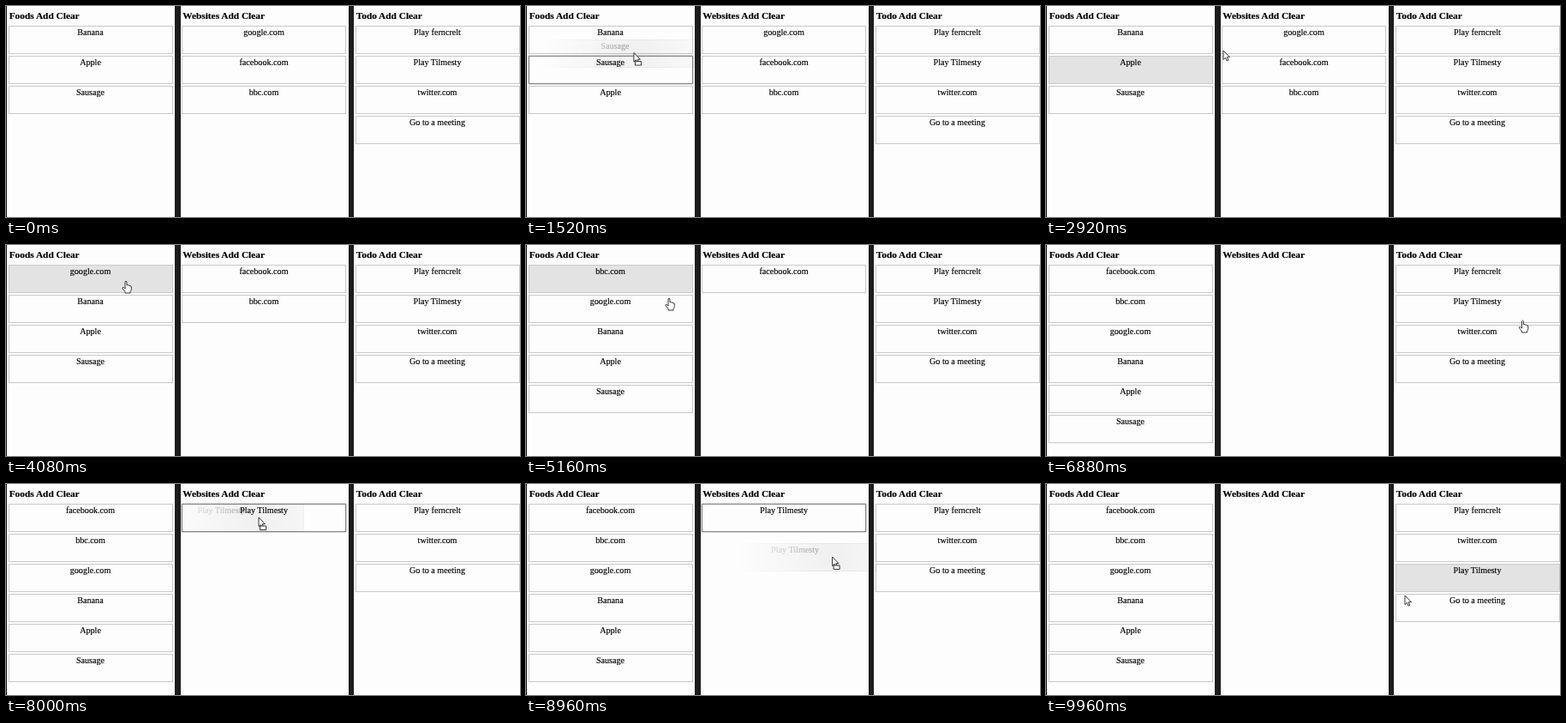
An HTML page for the animation above (10 s loop, 600 px wide and 246 px high).

```html
<!DOCTYPE html>
<html lang="en">
<head>
<meta charset="utf-8">
<title>Sortable lists</title>
<style>
  html, body { margin: 0; width: 100%; height: 100%; overflow: hidden; background: #1c1c1c; }
  #stage { position: absolute; left: 0; top: 0; width: 600px; height: 246px; overflow: hidden;
    font-family: "Liberation Serif", "Times New Roman", serif; color: #000; -webkit-text-stroke: .15px #000; }
  #stage > * { position: absolute; left: 0; top: 0; box-sizing: border-box; }
  .column { width: 196px; height: 246px; background: #fdfdfd; }
  .title { font-weight: bold; font-size: 11.35px; line-height: 14px; white-space: nowrap; }
  .card { width: 192px; height: 33px; border: 1px solid #c9c9c9; background: #fdfdfd;
    font-size: 10.15px; line-height: 14px; text-align: center; white-space: nowrap; }
  .card.active { background: #e3e3e3; }
  .card.held { border-color: #858585; box-shadow: 0 0 1.5px #8a8a8a; }
  .card.ghost { background: #dedede; border-color: #bbb; opacity: .4; mix-blend-mode: multiply; }
  svg { overflow: visible; }
</style>
</head>
<body>
<div id="stage"></div>
<script>
const LOOP = 10000;
const CARD = { w: 192, h: 33, pitch: 35, top: 23 };
const GRIP_Y = 16;
const lists = {
  Foods: ['Banana', 'Apple', 'Sausage'],
  Websites: ['google.com', 'facebook.com', 'bbc.com'],
  Todo: ['Play ferncrelt', 'Play Tilmesty', 'twitter.com', 'Go to a meeting']
};
// Each drag: card, target column and row, grip inside the card, times, drop point
const drags = [
  { card: 'Sausage', col: 0, row: 1, grip: 118, pick: 900, drop: 1560, to: [126, 54] },
  { card: 'Apple', col: 0, row: 1, grip: 118, pick: 2100, drop: 2880, to: [207, 52] },
  { card: 'google.com', col: 0, row: 0, grip: 118, pick: 3450, drop: 4000, to: [140, 42] },
  { card: 'bbc.com', col: 0, row: 0, grip: 118, pick: 4500, drop: 5090, to: [167, 62] },
  { card: 'facebook.com', col: 0, row: 0, grip: 118, pick: 5750, drop: 6350, to: [130, 42] },
  { card: 'Play Tilmesty', col: 1, row: 0, grip: 139.5, pick: 7150, drop: 8000, to: [295, 39] },
  { card: 'Play Tilmesty', col: 2, row: 2, grip: 139.5, pick: 8000, drop: 9910, to: [419, 130] }
];

const stage = document.getElementById('stage');
const columnX = col => 1 + 202.5 * col;
const slot = (col, row) => [columnX(col) + 1.5, CARD.top + row * CARD.pitch];

function place(el, x, y) {
  el.style.left = x + 'px';
  el.style.top = y + 'px';
}

function add(className, x = 0, y = 0, text = '') {
  const el = document.createElement('div');
  el.className = className;
  el.textContent = text;
  place(el, x, y);
  stage.append(el);
  return el;
}

Object.keys(lists).forEach((name, col) => {
  add('column', columnX(col));
  add('title', columnX(col) + 2.7, 3.7, name + ' Add Clear');
});
const cards = {};
Object.values(lists).flat().forEach(label => { cards[label] = add('card', 0, 0, label); });
const ghost = add('card ghost');

stage.insertAdjacentHTML('beforeend', `
  <svg id="pointer" width="1" height="1" fill="#fff" stroke="#222" stroke-width=".9" stroke-linejoin="round">
    <g id="arrow">
      <path d="M0 0V10.5L2.5 8.3L4.2 12L5.8 11.3L4.2 7.7H7.4Z"/>
      <path id="box" d="M1.5 10H8.5V14.5H1.5Z"/>
    </g>
    <path id="hand" d="M-1 6.8V.8Q0-.8 1 .8V4.8Q2.4 3.8 2.8 5.2Q4.3 4.3 4.7 5.8Q6.3 5.2 6.3 7V9.5Q6.2 11.5 5 12.3V14H-1V12.4L-4 8.8Q-4.4 7.2-2.8 7.4L-1 9Z"/>
  </svg>`);
const [pointer, arrow, box, hand] = ['pointer', 'arrow', 'box', 'hand'].map(id => document.getElementById(id));

// Card positions at time t: a card changes place partway through its drag
function slotsAt(t) {
  const order = Object.values(lists).map(list => [...list]);
  for (const { card, col, row, pick, drop } of drags) {
    if (t < pick + (drop - pick) * 0.6) break;
    const from = order.find(list => list.includes(card));
    from.splice(from.indexOf(card), 1);
    order[col].splice(row, 0, card);
  }
  const slots = {};
  order.forEach((list, col) => list.forEach((card, row) => { slots[card] = slot(col, row); }));
  return slots;
}

// Pointer stops: settle beside the grip, take the card, carry it, rest after the drop
const path = [[60, 60, 252]];
drags.forEach((d, i) => {
  if (!i || d.pick > drags[i - 1].drop) {
    const [x, y] = slotsAt(d.pick)[d.card];
    const gx = x + d.grip, gy = y + GRIP_Y;
    path.push([d.pick - 270, gx + 9.5, gy + 14], [d.pick - 50, gx, gy], [d.pick, gx, gy]);
  }
  path.push([d.drop, ...d.to]);
  const next = drags[i + 1];
  if (!next || next.pick > d.drop) path.push([d.drop + 80, ...d.to]);
});

function pointerAt(t) {
  const i = path.findIndex(p => p[0] > t);
  if (i < 1) return path.at(i).slice(1);
  const [t0, x0, y0] = path[i - 1], [t1, x1, y1] = path[i];
  const u = (t - t0) / (t1 - t0), k = u * u * (3 - 2 * u);
  return [x0 + (x1 - x0) * k, y0 + (y1 - y0) * k];
}

function draw(t) {
  const during = (before, after) => drags.find(d => t >= d.pick - before && t < d.drop + after);
  const [x, y] = pointerAt(t);
  const slots = slotsAt(t);
  const held = during(0, 0);
  const pressed = during(80, 350);

  for (const label in cards) {
    const isHeld = held?.card === label;
    place(cards[label], ...slots[label]);
    cards[label].classList.toggle('held', isHeld);
    cards[label].classList.toggle('active', !isHeld && pressed?.card === label);
  }

  ghost.hidden = !held;
  ghost.style.display = held ? '' : 'none';
  if (held) {
    ghost.textContent = held.card;
    ghost.style.maskImage = `radial-gradient(circle at ${held.grip}px ${GRIP_Y}px, #000, transparent 110px)`;
    place(ghost, x - held.grip, y - GRIP_Y);
  }

  const over = Object.values(slots).some(([sx, sy]) =>
    x > sx && x < sx + CARD.w && y > sy && y < sy + CARD.h);
  const useHand = over && !during(0, 60);
  pointer.style.display = t < path[0][0] ? 'none' : '';
  pointer.style.transform = `translate(${x}px, ${y}px)`;
  hand.style.display = useHand ? '' : 'none';
  arrow.style.display = useHand ? 'none' : '';
  box.style.display = held ? '' : 'none';
}

const begin = performance.now();
function tick() {
  draw((performance.now() - begin) % LOOP);
  requestAnimationFrame(tick);
}
tick();
</script>
</body>
</html>
```
